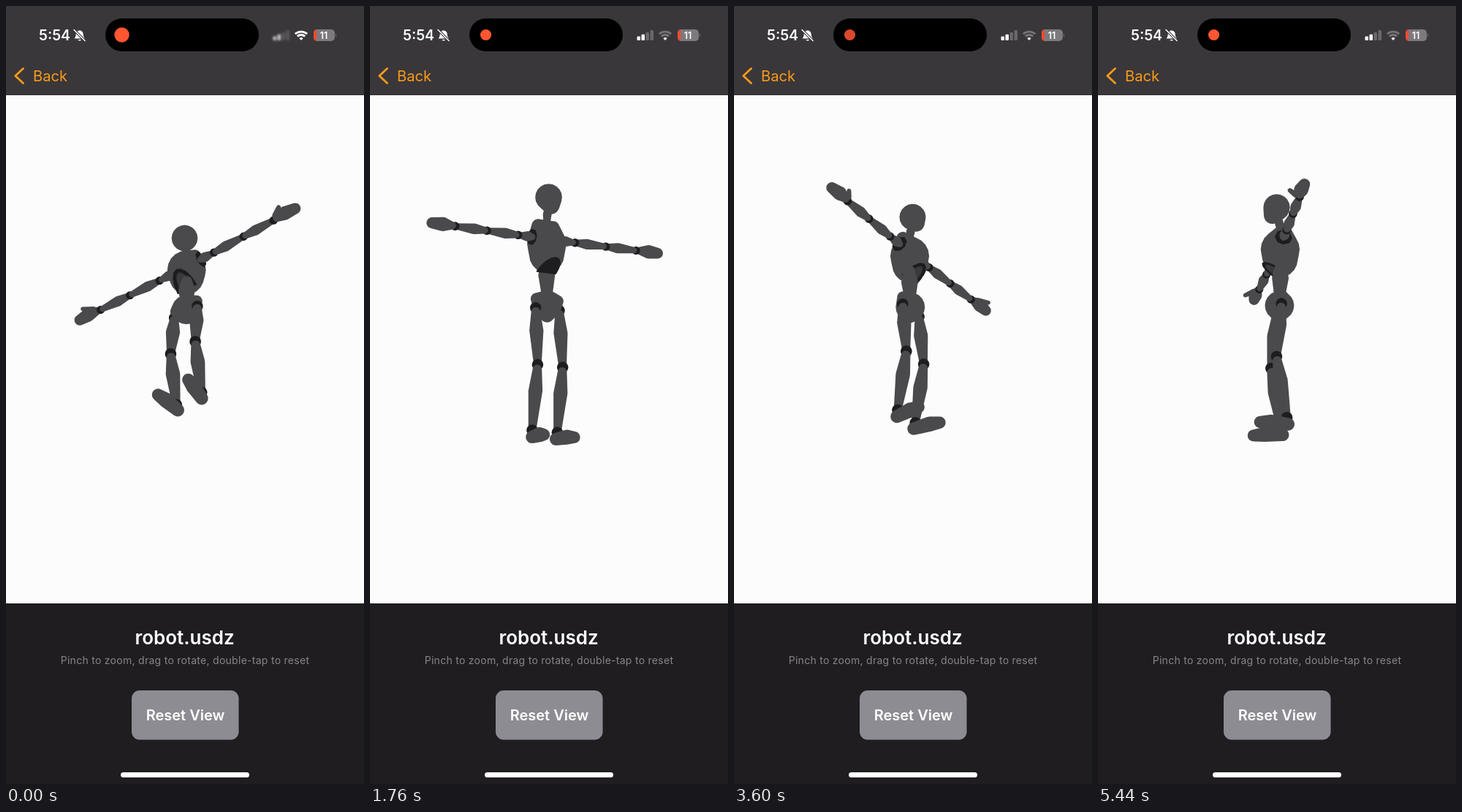
Write an HTML page that moves like this. It is 490x1064 px and loops after 5.52 s.

```html
<!DOCTYPE html>
<html lang="en">
<head>
<meta charset="utf-8">
<title>Model viewer</title>
<style>
  html, body { margin: 0; width: 100%; height: 100%; overflow: hidden; background: #1f1d20; }
  svg { display: block; width: 100%; height: 100%; }
  text { font-family: Inter, Roboto, sans-serif; fill: #fff; }
  .mid { text-anchor: middle; }
  .bold { font-weight: 600; }
</style>
</head>
<body>
<svg viewBox="0 0 490 1064">
  <rect width="490" height="1064" fill="#1f1d20"/>
  <rect width="490" height="122" fill="#39373a"/>
  <rect y="121" width="490" height="1" fill="#2b2a2c"/>
  <rect y="122" width="490" height="695" fill="#fcfcfc"/>

  <text class="bold" x="45" y="47" font-size="19.500">5:54</text>
  <g fill="#fff">
    <path d="M93.500 44.500c2-2 2-4 2.200-6 .3-3 2-5 5-5s4.800 2 5 5c.2 2 .3 4 2.300 6z"/>
    <path d="M98.500 46h4.500a2.300 2 0 0 1-4.500 0z"/>
    <path d="M93 32.500l15 15" stroke="#39373a" stroke-width="3.500"/>
    <path d="M93 32.500l15 15" stroke="#fff" stroke-width="1.500" stroke-linecap="round"/>
  </g>
  <rect x="136" y="17" width="210" height="45" rx="22.500"/>
  <circle id="dot" cx="158.500" cy="39.500"/>

  <g id="bars"></g>
  <g fill="none" stroke="#fff" stroke-width="2.800">
    <g id="arcs">
      <path d="M395.800 38.300a12 12 0 0 1 16.400 0"/>
      <path d="M398.800 41.600a7.500 7.500 0 0 1 10.400 0"/>
    </g>
    <path d="M404 47l-2.600-2.800a4 4 0 0 1 5.200 0z" fill="#fff" stroke="none"/>
  </g>
  <clipPath id="cell"><rect x="421" y="32" width="29" height="16" rx="5"/></clipPath>
  <g clip-path="url(#cell)">
    <rect x="421" y="32" width="29" height="16" fill="#7c7a7e"/>
    <rect x="421" y="32" width="4" height="16" fill="#f2492f"/>
  </g>
  <path d="M451 37.500q2 2.500 0 5z" fill="#7c7a7e"/>
  <text class="mid bold" x="435" y="44.600" font-size="12.500">11</text>

  <path d="M23.500 85.500L12.800 95.500l10.700 10" fill="none" stroke="#fc9a18" stroke-width="2.800" stroke-linecap="round" stroke-linejoin="round"/>
  <text x="37" y="103" font-size="20.200" style="fill:#fc9a18">Back</text>

  <g id="robot"></g>

  <text class="mid bold" x="244.500" y="873" font-size="26">robot.usdz</text>
  <text class="mid" x="245" y="900" font-size="14" letter-spacing=".28" style="fill:#868589">Pinch to zoom, drag to rotate, double-tap to reset</text>
  <rect x="172" y="936" width="146.500" height="67.500" rx="11" fill="#8d8c93"/>
  <text class="mid bold" x="245.500" y="977" font-size="20">Reset View</text>
  <rect x="157" y="1048" width="176" height="7" rx="3.500" fill="#fff"/>
</svg>
<script>
const LOOP = 5520, STEP = 80, CAMERA = 3500;
const BODY = '#4a494b', JOINT = '#1d1c1e', INNER = '#3a393b';
const $ = id => document.getElementById(id);
const range = n => Array.from({ length: n }, (_, i) => i);

// Drag poses in degrees; a positive pitch looks from below
const POSES = [
  { t: 0, yaw: -34, pitch: 49 },
  { t: 1280, yaw: 11, pitch: 33 },
  { t: 2320, yaw: 58, pitch: -16.5 },
  { t: 3040, yaw: 96, pitch: -27 },
  { t: 3600, yaw: 54, pitch: 34 },
  { t: 4320, yaw: -50, pitch: 57 },
  { t: 5040, yaw: -70, pitch: 27 },
  { t: 5440, yaw: -79, pitch: 25 }
];

// Monotone cubic through the poses
function pose(key, t) {
  const last = POSES.length - 1;
  const rate = i => (POSES[i + 1][key] - POSES[i][key]) / (POSES[i + 1].t - POSES[i].t);
  const slope = i => {
    const a = rate(Math.max(i - 1, 0)), b = rate(Math.min(i, last - 1));
    return a * b <= 0 ? 0 : 2 * a * b / (a + b);
  };
  const next = POSES.findIndex(p => p.t > t);
  const i = next < 0 ? last - 1 : next - 1;
  const from = POSES[i], to = POSES[i + 1], span = to.t - from.t;
  const u = Math.min(1, (t - from.t) / span), v = 1 - u;
  return from[key] * (1 + 2 * u) * v * v + slope(i) * span * u * v * v
    + to[key] * (1 + 2 * v) * u * u - slope(i + 1) * span * u * u * v;
}

// A part is the convex hull of balls [x, y, z, radius]; parts with a normal show from that side only
const parts = [];
const add = (fill, balls, bias = 0, normal = null) => parts.push({ fill, balls, bias, normal });
const mix = (a, b, u) => a.map((v, i) => v + (b[i] - v) * u);

function bone(a, b, r) {
  add(BODY, [[...mix(a, b, .07), r * .65], [...mix(a, b, .4), r], [...mix(a, b, .93), r * .6]]);
}
function limb(joints, r) {
  joints.forEach((joint, i) => {
    add(JOINT, [[...joint, r * .8]], -2);
    if (i) bone(joints[i - 1], joint, r);
  });
}
function ribArch(fill, width, rise, bias) {
  const balls = range(9).map(i => {
    const a = i * Math.PI / 8, lift = rise * Math.sin(a);
    return [width * Math.cos(a), 60 + lift, -6 + 1.6 * lift, 1];
  });
  add(fill, balls, bias, [0, -.85, .5]);
}

// Head, neck, chest, waist, pelvis
add(BODY, [[0, 165, 0, 18.5], [0, 152, 6, 12]]);
bone([0, 155, -2], [0, 120, -6], 6);
add(BODY, [[-12, 125, -8, 9], [12, 125, -8, 9], [0, 100, -5, 27], [0, 84, -5, 24]], -4);
ribArch(JOINT, 15, 16, 0);
ribArch(INNER, 9, 13, 1);
bone([0, 80, -6], [0, 20, -4], 11.5);
add(BODY, [[-17, 21, -4, 8], [17, 21, -4, 8], [0, 14, -4, 20], [0, 0, -4, 10]], -2);

for (const side of [-1, 1]) {
  const at = (x, y, z) => [x * side, y, z];
  const socket = range(8).map(i => {
    const a = i * Math.PI / 4;
    return [...at(24, 107 + 9 * Math.sin(a), -5 + 10 * Math.cos(a)), 2];
  });
  add(JOINT, socket, 0, at(1, 0, 0));
  bone(at(22, 107, -5), at(44, 107, -5), 7);
  limb([at(46, 107, -5), at(96, 107, -4), at(146, 107, -3)], 7.2);
  add(BODY, [[...at(152, 107, -2), 5.5], [...at(166, 107, -1), 9.5], [...at(182, 107, -2), 7.5]]);
  add(BODY, [[...at(153, 106, 4), 4], [...at(165, 105, 14), 3]]);

  limb([at(19, 8, -3), at(20, -72, 4), at(20, -160, -10)], 9.6);
  add(BODY, [[...at(19, -169, -12), 8.5], [...at(22, -169, 12), 10], [...at(24, -171, 27), 8]]);
}

function hull(points) {
  points.sort((p, q) => p[0] - q[0] || p[1] - q[1]);
  const half = list => {
    const out = [];
    for (const p of list) {
      while (out.length > 1) {
        const [a, b] = out.slice(-2);
        if ((b[0] - a[0]) * (p[1] - a[1]) - (b[1] - a[1]) * (p[0] - a[0]) > 0) break;
        out.pop();
      }
      out.push(p);
    }
    out.pop();
    return out;
  };
  return half(points).concat(half(points.slice().reverse()));
}

function drawRobot(yaw, pitch) {
  const ca = Math.cos(yaw), sa = Math.sin(yaw), cp = Math.cos(pitch), sp = Math.sin(pitch);
  const turn = ([x, y, z]) => {
    const depth = z * ca - x * sa;
    return [x * ca + z * sa, y * cp + depth * sp, depth * cp - y * sp];
  };
  const shapes = [];
  for (const { fill, balls, bias, normal } of parts) {
    if (normal && turn(normal)[2] < .25) continue;
    let depth = bias;
    const points = balls.flatMap(ball => {
      const [x, y, z] = turn(ball), r = ball[3], scale = CAMERA / (CAMERA - z);
      depth += z / balls.length;
      return range(20).map(k => {
        const a = k * Math.PI / 10;
        return [244.5 + (x + r * Math.cos(a)) * scale, 422 - (y + r * Math.sin(a)) * scale];
      });
    });
    const outline = hull(points).map(p => p.map(n => n.toFixed(2)).join()).join(' ');
    shapes.push({ depth, markup: `<polygon fill="${fill}" points="${outline}"/>` });
  }
  shapes.sort((a, b) => a.depth - b.depth);
  $('robot').innerHTML = shapes.map(s => s.markup).join('');
}

function drawStatus(t) {
  const settle = Math.min(1, t / 480);
  const dim = Math.exp(-(((t - 3520) / 400) ** 2));
  $('dot').setAttribute('r', 10.2 - 2.6 * settle);
  $('dot').setAttribute('fill', `rgb(${255 - 38 * dim},${86 - 14 * dim},${50 - 6 * dim})`);
  $('bars').style.filter = settle < 1 ? `blur(${1.5 * (1 - settle)}px)` : 'none';
  $('bars').style.opacity = .7 + .3 * settle;
  $('arcs').style.opacity = 1 - .7 * settle;
}

$('bars').innerHTML = range(4).map(i => {
  const height = 5.5 + 2.8 * i;
  return `<rect x="${365.5 + 6 * i}" y="${47 - height}" width="4.5" height="${height}" rx="1.3" fill="${i < 2 ? '#fff' : '#69676b'}"/>`;
}).join('');

function frame(elapsed) {
  const t = Math.floor(elapsed % LOOP / STEP) * STEP, rad = Math.PI / 180;
  drawRobot(pose('yaw', t) * rad, pose('pitch', t) * rad);
  drawStatus(t);
  requestAnimationFrame(() => frame(performance.now() - start));
}
const start = performance.now();
frame(0);
</script>
</body>
</html>
```
